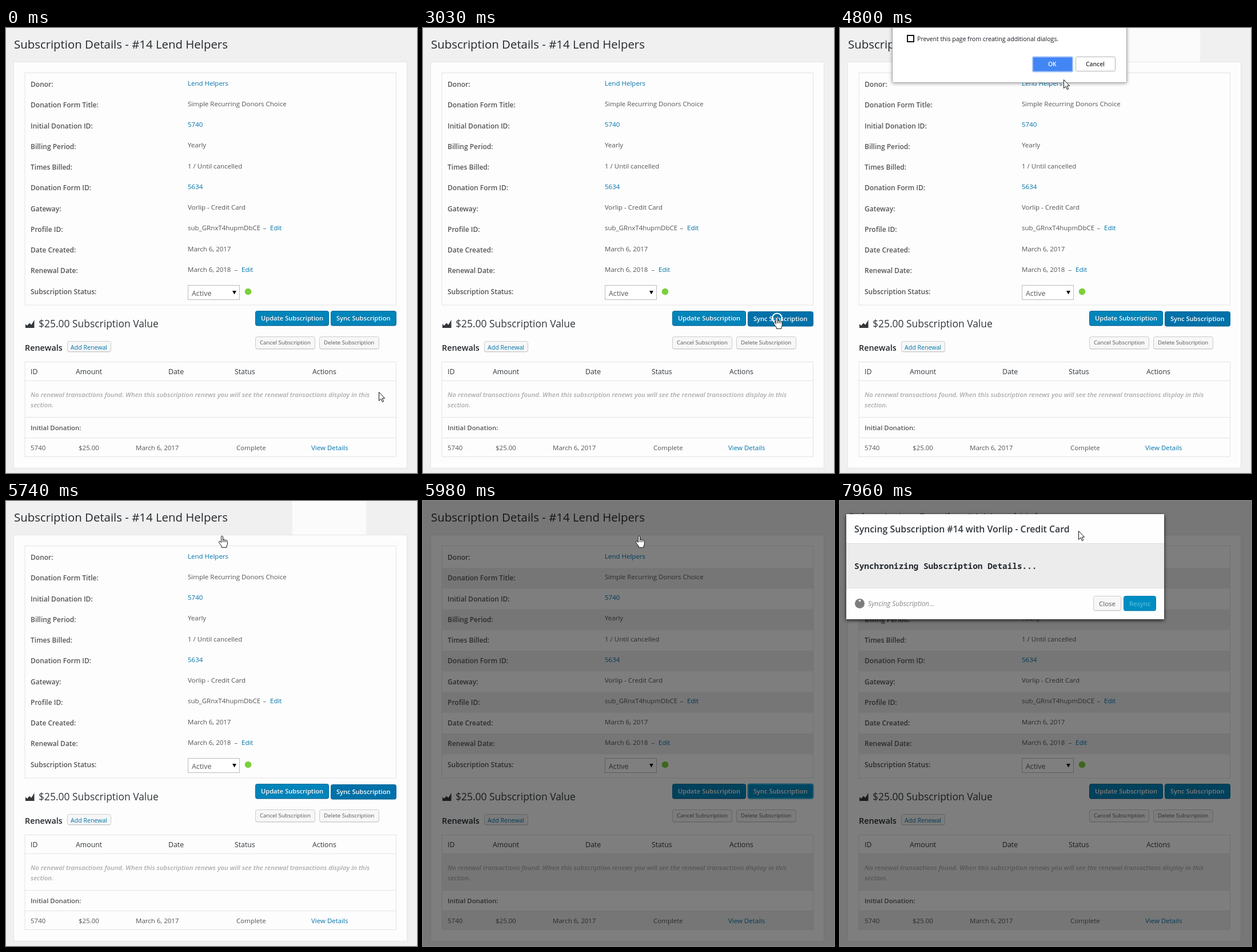
Animation, 719 px wide and 779 px high, one loop 8000 ms. Source, as an HTML page:

```html
<!DOCTYPE html>
<html lang="en">
<head>
<meta charset="utf-8">
<title>Subscription details</title>
<style>
  html, body { margin: 0; width: 100%; height: 100%; overflow: hidden; background: #f0f0f0; }
  svg { display: block; width: 719px; height: 779px; font: 11.5px "Open Sans", sans-serif; fill: #555; }
  text { white-space: pre; }
  .title { font-size: 20.4px; fill: #23282d; }
  .label { font-size: 12px; font-weight: 600; }
  .link { fill: #0073aa; }
  .value { font-size: 17.45px; fill: #32373c; }
  .renewals { font-size: 14.4px; font-weight: 600; fill: #23282d; }
  .head { font-size: 12.3px; fill: #32373c; }
  .empty { font-size: 11.4px; font-weight: 600; font-style: italic; fill: #aaa; }
  .initial { font-size: 11.4px; font-weight: 600; }
  .small { font-size: 9.7px; }
  .add { font-size: 10.6px; fill: #0073aa; }
  .white { font-size: 11.1px; font-weight: 600; fill: #fff; text-shadow: 0 -1px 1px #006799; }
  .alert { font-size: 10.6px; fill: #1b1b26; }
  .choice { font-size: 10.3px; font-weight: 600; fill: #333; }
  .modal-title { font-size: 15.85px; font-weight: 600; fill: #32373c; }
  .log { font: bold 14.4px "Noto Sans Mono", monospace; fill: #23282d; }
  .busy { font-size: 11.8px; font-style: italic; fill: #888; }
  #dialog { filter: drop-shadow(0 1px 3px rgba(0, 0, 0, .35)); }
  #frame { filter: drop-shadow(0 2px 3px rgba(0, 0, 0, .8)); }
</style>
</head>
<body>
<svg id="stage" viewBox="0 0 719 779"></svg>
<script>
const LOOP = 8000, STEP = 120, ROW = 36.25;

const text = (x, y, str, cls = '') => `<text x="${x}" y="${y}" class="${cls}">${str}</text>`;
const rect = (x, y, w, h, fill, stroke = 'none', more = '') =>
  `<rect x="${x}" y="${y}" width="${w}" height="${h}" fill="${fill}" stroke="${stroke}" ${more}/>`;
const line = y => `<path d="M33 ${y}H683" stroke="#e3e3e3"/>`;
const button = (x, y, w, h, fill, stroke, id = '') =>
  rect(x + .5, y + 1.5, w - 1, h - 1, stroke, 'none', 'rx="3"') +
  rect(x + .5, y + .5, w - 1, h - 1, fill, stroke, `rx="3" ${id && `id="${id}"`}`);
const grey = (x, y, w, h, id) => button(x, y, w, h, '#f7f7f7', '#ccc', id);

const donor = 'Lend Helpers', gateway = 'Vorlip - Credit Card';
const details = [
  ['Donor:', donor, 1],
  ['Donation Form Title:', 'Simple Recurring Donors Choice'],
  ['Initial Donation ID:', '5740', 1],
  ['Billing Period:', 'Yearly'],
  ['Times Billed:', '1 / Until cancelled'],
  ['Donation Form ID:', '5634', 1],
  ['Gateway:', gateway],
  ['Profile ID:', 'sub_GRnxT4hupmDbCE'],
  ['Date Created:', 'March 6, 2017'],
  ['Renewal Date:', 'March 6, 2018'],
  ['Subscription Status:', '']
];
const edit = (x, row) =>
  text(x, 100.7 + ROW * row, '–') + text(x + 12.5, 100.7 + ROW * row, 'Edit', 'link');

const stripes = [1, 3, 5, 7, 9].map(i => rect(33, 80.75 + ROW * i, 650, ROW, '#eee')).join('') +
  rect(33, 618, 650, 63, '#eee') + rect(33, 717, 650, 34, '#eee');

const page = `
  ${rect(13.5, 59.5, 688, 711, '#fdfdfd', '#e5e5e5')}
  <g id="stripes">${stripes}</g>
  ${rect(33, 78.5, 649.5, 406.5, 'none', '#e3e3e3')}
  ${text(14, 36, 'Subscription Details - #14 ' + donor, 'title')}
  ${details.map(([label, value, link], i) =>
    text(43, 103.2 + ROW * i, label, 'label') +
    text(318, 100.7 + ROW * i, value, link ? 'link' : '')).join('')}
  ${edit(449.5, 7)}${edit(399.5, 9)}
  ${rect(318.5, 450.5, 90, 25, '#fff', '#bbb')}
  <text x="325" y="468.5" font-size="12.4">Active</text>
  <path d="M396 460h7l-3.5 6.5z" fill="#111"/>
  <circle cx="423.5" cy="461.5" r="5.8" fill="#7ad03a"/>

  <path d="M34 525V518L37 521 41 516.5 44.5 519.5 49.5 511V525z" fill="#32373c"/>
  ${text(57, 524, '$25.00 Subscription Value', 'value')}
  ${button(436, 495, 129, 26, '#0085ba', '#006799')}
  ${text(446, 512, 'Update Subscription', 'white')}
  <g id="sync">${button(568, 495, 115, 26, '#0085ba', '#006799', 'syncFace')}
  ${text(578, 512, 'Sync Subscription', 'white')}</g>
  ${text(33, 565, 'Renewals', 'renewals')}
  ${grey(107, 548, 77, 19)}${text(113, 562.5, 'Add Renewal', 'add')}
  ${grey(436, 540, 105, 22)}${text(444, 554, 'Cancel Subscription', 'small')}
  ${grey(548, 540, 105, 22, 'remove')}${text(556, 554, 'Delete Subscription', 'small')}

  ${rect(33, 584.5, 649.5, 166, 'none', '#e3e3e3')}
  ${[617.5, 681.5, 717.5].map(line).join('')}
  ${[[43, 'ID'], [122, 'Amount'], [284, 'Date'], [400, 'Status'], [536, 'Actions']]
    .map(([x, s]) => text(x, 606, s, 'head')).join('')}
  ${text(43, 646, 'No renewal transactions found. When this subscription renews you will see the renewal transactions display in this', 'empty')}
  ${text(43, 663.5, 'section.', 'empty')}
  ${text(43, 704, 'Initial Donation:', 'initial')}
  ${[[43, '5740'], [127, '$25.00'], [227, 'March 6, 2017'], [403, 'Complete']]
    .map(([x, s]) => text(x, 739, s)).join('')}
  ${text(534, 739, 'View Details', 'link')}`;

const dialog = `
  ${rect(91.5, -10.5, 410, 106, '#fff', '#aaa', 'id="dialog" rx="2"')}
  ${rect(118, 13, 11, 11, '#fff', '#111', 'stroke-width="2"')}
  ${text(135, 22.5, 'Prevent this page from creating additional dialogs.', 'alert')}
  ${rect(337, 50.5, 70, 26, '#4285f4', '#a3c3fa', 'id="ok" rx="2" stroke-width="2"')}
  <text x="364" y="67" class="choice" style="fill:#fff">OK</text>
  ${rect(412.5, 50.5, 69, 25, '#fff', '#b4b4b4', 'rx="2"')}
  ${text(430, 67, 'Cancel', 'choice')}`;

const modal = `
  ${rect(11, 23, 556, 184, '#fefefe', 'none', 'id="frame"')}
  ${rect(11, 75, 556, 77, '#ececec')}
  <path d="M11 74.5H567M11 152.5H567" stroke="#ddd"/>
  ${text(25, 54.5, 'Syncing Subscription #14 with ' + gateway, 'modal-title')}
  ${text(25, 119, 'Synchronizing Subscription Details...', 'log')}
  <circle cx="34.5" cy="179.5" r="8.5" fill="#7d7d7d"/>
  <circle id="dot" cx="39.5" cy="179.5" r="1.8" fill="#fff"/>
  ${text(49, 184, 'Syncing Subscription...', 'busy')}
  ${grey(443, 166, 49, 26)}${text(453, 184, 'Close')}
  ${button(496, 166, 57, 26, '#008ec2', '#007cb2')}
  <text x="506" y="184" style="fill:#66c6e4">Resync</text>`;

const stage = document.getElementById('stage');
stage.innerHTML = `${rect(0, 0, 719, 779, '#f0f0f0')}${page}
  <g id="alert">${rect(501, 0, 129, 59, '#fbfbfb')}<g id="box">${dialog}</g></g>
  <rect id="dim" width="719" height="779" fill="#000"/>
  <g id="modal">${modal}</g>
  <g id="cursor" fill="#fff" stroke="#111" stroke-linejoin="round">
    <circle id="ring" cx=".5" cy="2" r="8.5" fill="none" stroke="#fff" stroke-width="2"/>
    <path id="arrow" d="M.5 .5V15.5L4 12.2L6.4 17.7L8.6 16.7L6.2 11.2H10.6Z"/>
    <path id="hand" d="M-1.5 1.8Q-1.5 .3 0 .3Q1.5 .3 1.5 1.8V7Q1.8 6 3 6.2T4.2 7.5Q4.5 6.6 5.6 6.9T6.8 8.3Q7.2 7.5 8.3 8T9.4 9.6V14Q9.2 16 8 17.6V20.3H-.8V18Q-3.5 14.8 -5 12.2Q-6 10.2 -5 9.5Q-3.6 9 -1.5 11.5ZM1.5 7V11M4.2 8V11M6.8 9V11"/>
  </g>`;
const el = id => document.getElementById(id);
const set = (id, attrs) => Object.entries(attrs).forEach(([k, v]) => el(id).setAttribute(k, v));
const show = (id, on) => { el(id).style.display = on ? '' : 'none'; };

// Each leg: start time, number of steps, destination.
const legs = [
  [930, 7, 630, 534], [1770, 3, 625, 512], [2160, 1, 619, 506],
  [4080, 7, 391, 90], [4950, 2, 377, 63], [5220, 1, 378, 61], [7240, 5, 417, 52]
];

function cursorAt(t) {
  let x = 652, y = 637;
  for (const [start, steps, toX, toY] of legs) {
    let k = Math.min(Math.max(Math.floor((t - start) / STEP) + 1, 0), steps) / steps;
    if (steps > 4) k = k * k * (3 - 2 * k);
    x += (toX - x) * k;
    y += (toY - y) * k;
  }
  return [x, y];
}

function draw(t) {
  const within = (from, to) => t >= from && t < to;
  const [x, y] = cursorAt(t);
  const overDelete = t < 2000 && y > 540 && y < 562;
  const overSync = t < 3030 && y < 521;
  const pressed = within(3030, 5860), focused = within(5860, 6250);

  set('cursor', { transform: `translate(${x.toFixed(2)} ${y.toFixed(2)})` });
  const pointing = overDelete || overSync || within(3030, 3150) || within(5740, 7240);
  show('hand', pointing);
  show('arrow', !pointing);
  show('ring', within(3030, 3150) || within(5590, 5740));

  set('remove', { stroke: overDelete ? '#999' : '#ccc' });
  set('sync', { transform: `translate(0 ${pressed ? 1 : 0})` });
  set('syncFace', {
    fill: pressed ? '#0071a9' : overSync || focused ? '#008ec2' : '#0085ba',
    stroke: focused ? '#33b3db' : '#006799',
    'stroke-width': focused ? 2 : 1
  });

  show('alert', within(3150, 5860));
  show('box', t < 5740);
  set('ok', { fill: t >= 5070 ? '#3b78e7' : '#4285f4' });

  show('stripes', t >= 5860);
  set('dim', { opacity: t < 5860 ? 0 : t < 5980 ? .47 : .5 });
  show('modal', t >= 6130);
  const arriving = t < 6250;
  set('modal', { opacity: arriving ? .55 : 1, transform: `translate(0 ${arriving ? -19 : 0})` });
  const turn = 180 + Math.floor((t - 6640) / STEP) * 450 / 11;
  set('dot', { transform: `rotate(${turn} 34.5 179.5)` });
}

function tick() {
  draw(performance.now() % LOOP);
  requestAnimationFrame(tick);
}
tick();
</script>
</body>
</html>
```
